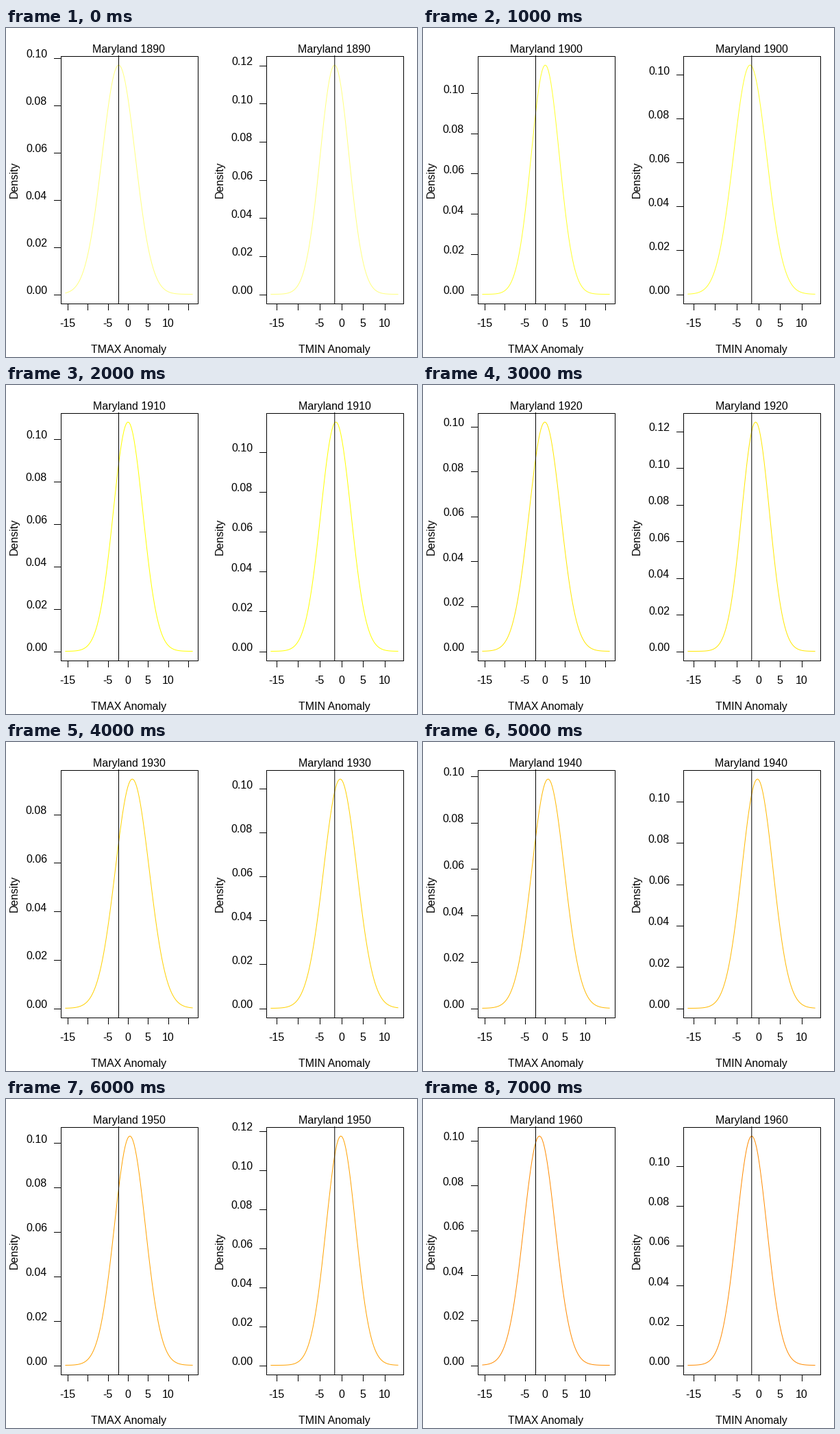
A matplotlib script that plays this animation: 600 by 480 pixels, repeating every 8 s.

```python
import colorsys

import matplotlib.pyplot as plt
import numpy as np
from matplotlib.animation import FuncAnimation

W, H, DPI = 600, 480, 96
PX = 72 / DPI
TOP, BOTTOM = 40.5, 401.5
PEAK_Y, ZERO_Y = 54, 388.5
BOX_W = 200
X_LABELS = (-15, -5, 0, 5, 10)

plt.rcParams["font.family"] = "Liberation Sans"
plt.rcParams["font.size"] = 16 * PX

# Per decade: mean and peak density for TMAX, then for TMIN
DECADES = {
    1890: ((-2.28, 0.0970), (-1.55, 0.1202)),
    1900: ((0.10, 0.1140), (-1.90, 0.1044)),
    1910: ((0.05, 0.1080), (-1.25, 0.1150)),
    1920: ((0.00, 0.1020), (-0.62, 0.1251)),
    1930: ((1.10, 0.0946), (-0.25, 0.1044)),
    1940: ((0.80, 0.0988), (-0.20, 0.1110)),
    1950: ((0.50, 0.1031), (-0.10, 0.1174)),
    1960: ((-1.35, 0.1020), (-1.52, 0.1150)),
}
YEARS = list(DECADES)

# Left edge, x of zero, pixels per degree, last tick, reference line, label
PANELS = (
    (79.5, 177.9, 5.86, 15, 164.5, "TMAX Anomaly"),
    (379.5, 489.5, 6.33, 10, 479.8, "TMIN Anomaly"),
)


def heat_color(i):
    """Pale yellow, through yellow, towards red."""
    if i < 2:
        return colorsys.hsv_to_rgb(1 / 6, 0.5 + i / 3, 1)
    return colorsys.hsv_to_rgb((1 - (i - 2) / 11) / 6, 1, 1)


fig = plt.figure(figsize=(W / DPI, H / DPI), dpi=DPI, facecolor="white")
ax = fig.add_axes([0, 0, 1, 1])


def line(x, y, color="black", **kw):
    ax.plot(x, y, color=color, lw=PX, **kw)


def text(x, y, s, ha="center", **kw):
    ax.text(x, y, s, ha=ha, va="baseline", **kw)


def draw_panel(panel, mean, peak, year, color):
    left, zero, unit, last, ref, label = panel
    right, mid = left + BOX_W, left + BOX_W / 2
    line([left, right, right, left, left], [TOP, TOP, BOTTOM, BOTTOM, TOP])

    for v in range(-15, last + 1, 5):
        x = zero + v * unit
        line([x, x], [BOTTOM, BOTTOM + 9.6])
        if v in X_LABELS:
            text(x, 436, str(v))

    scale = (ZERO_Y - PEAK_Y) / peak
    for k in range(int(peak * 1.04 / 0.02) + 1):
        y = ZERO_Y - 0.02 * k * scale
        line([left - 9.6, left], [y, y])
        text(left - 19.5, y - 0.5, f"{0.02 * k:.2f}", ha="right")

    x = np.linspace(left + 7.4, right - 7.4, 101)
    sigma = 1 / (peak * np.sqrt(2 * np.pi))
    z = ((x - zero) / unit - mean) / sigma
    line(x, ZERO_Y - (ZERO_Y - PEAK_Y) * np.exp(-z * z / 2), color)
    line([ref, ref], [TOP, BOTTOM], snap=False)

    text(mid, 36, f"Maryland {year}")
    text(mid, 474, label)
    text(left - 62.5, 221, "Density", rotation=90, rotation_mode="anchor")


def draw(i):
    ax.clear()
    ax.set(xlim=(0, W), ylim=(H, 0))
    ax.axis("off")
    year = YEARS[i]
    for panel, (mean, peak) in zip(PANELS, DECADES[year]):
        draw_panel(panel, mean, peak, year, heat_color(i))


anim = FuncAnimation(fig, draw, frames=len(YEARS), interval=1000,
                     init_func=lambda: None, repeat=True, repeat_delay=0)
plt.show()
```
